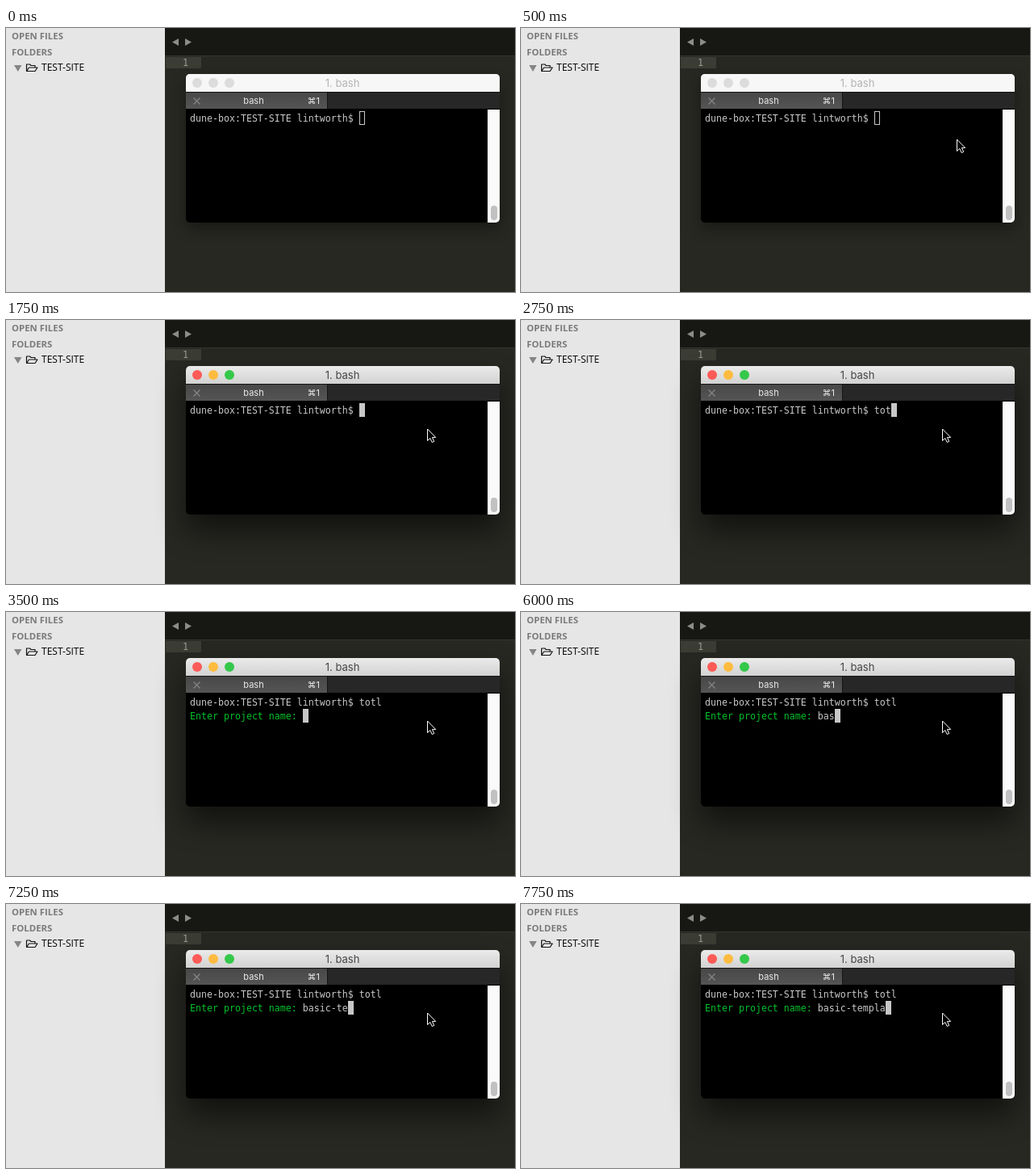
An HTML page that plays this animation: 631 by 327 pixels, repeating every 8 s.

```html
<!DOCTYPE html>
<html lang="en">
<head>
<meta charset="utf-8">
<title>Terminal project prompt</title>
<style>
html, body { margin: 0; width: 100%; height: 100%; overflow: hidden; background: #272822; }
svg { display: block; width: 631px; height: 327px; }
text { white-space: pre; }

.head { font: bold 11.4px "Open Sans", sans-serif; fill: #7b7b7b; }
.item { font: 12px "Open Sans", sans-serif; fill: #000; }
.mono { font: 11.627px "DejaVu Sans Mono", monospace; fill: #c9c9c9; }
.ui { font: 11px Inter, "DejaVu Sans", sans-serif; fill: #eaeaea; }
.title { font: 13px Inter, sans-serif; }

.win, .caret, .line2, .mouse { animation: 8s step-end infinite; }
.win { animation-name: focus; }
.caret { animation-name: type; }
.line2 { animation-name: prompt; }
.mouse { animation-name: point; }

.shadow { fill: #000; opacity: var(--shade); filter: blur(var(--blur)); transform: translateY(var(--drop)); }
.bar-top { stop-color: #ebebeb; }
.bar-end { stop-color: #d2d2d2; }
.idle-bar { fill: #f7f7f7; opacity: var(--idle); }
.title { fill: var(--title); }
.red { fill: var(--red); }
.amber { fill: var(--amber); }
.green { fill: var(--green); }
.block { fill: var(--block); stroke: #c7c7c7; }

@keyframes focus {
  0% {
    --idle: 1; --title: #b3b3b3; --block: #000;
    --red: #dcdcdc; --amber: #dcdcdc; --green: #dcdcdc;
    --shade: .35; --blur: 9px; --drop: 8px;
  }
  21.875% {
    --idle: 0; --title: #444; --block: #c7c7c7;
    --red: #fc5b57; --amber: #fdbc40; --green: #34c84a;
    --shade: .55; --blur: 18px; --drop: 20px;
  }
}

/* One character cell is 7 by 17 px. */
@keyframes type {
  0% { transform: translate(438px, 103px); }
  31.25% { transform: translate(452px, 103px); }
  34.375% { transform: translate(459px, 103px); }
  37.5% { transform: translate(466px, 103px); }
  43.75% { transform: translate(368px, 120px); }
  75% { transform: translate(389px, 120px); }
  78.125% { transform: translate(396px, 120px); }
  81.25% { transform: translate(403px, 120px); }
  84.375% { transform: translate(410px, 120px); }
  87.5% { transform: translate(417px, 120px); }
  90.625% { transform: translate(424px, 120px); }
  93.75% { transform: translate(431px, 120px); }
  96.875% { transform: translate(452px, 120px); }
}

@keyframes prompt {
  0% { opacity: 0; }
  43.75% { opacity: 1; }
}

@keyframes point {
  0% { opacity: 0; transform: translate(573px, 121px); }
  3.125% { opacity: 1; transform: translate(573px, 121px); }
  6.25% { opacity: 1; transform: translate(539px, 137px); }
  15.625% { opacity: 1; transform: translate(523px, 134px); }
  18.75% { opacity: 1; transform: translate(521px, 134px); }
}
</style>
</head>
<body>
<svg viewBox="0 0 631 327">
  <defs>
    <linearGradient id="bar" x2="0" y2="1">
      <stop class="bar-top"/>
      <stop class="bar-end" offset="1"/>
    </linearGradient>
    <linearGradient id="tab" x2="0" y2="1">
      <stop stop-color="#484848"/>
      <stop offset="1" stop-color="#555"/>
    </linearGradient>
    <clipPath id="frame"><rect x="223" y="57" width="389" height="184" rx="5"/></clipPath>
  </defs>

  <!-- Editor -->
  <rect width="631" height="327" fill="#272822"/>
  <rect x="197" width="434" height="34" fill="#171814"/>
  <rect x="197" y="34" width="434" height="1" fill="#34352e"/>
  <rect x="198" y="36" width="44" height="14" fill="#3b3c33"/>
  <path d="M214 13v9l-8-4.5zM222 13v9l8-4.5z" fill="#8c8d88"/>
  <text class="mono" x="219" y="47" style="fill:#9b9c94">1</text>

  <!-- Sidebar -->
  <rect width="197" height="327" fill="#e6e6e6"/>
  <text class="head" x="7" y="14">OPEN FILES</text>
  <text class="head" x="7" y="34">FOLDERS</text>
  <path d="M10 46h9.500l-4.750 8z" fill="#858585"/>
  <path d="M25.500 53.500v-8.500h4l1.500 1.500h5v2.500M25.500 53.500l3-4.500h10.500l-3 4.500z"
        fill="none" stroke="#111" stroke-width="1.200" stroke-linejoin="round"/>
  <text class="item" x="44" y="53">TEST-SITE</text>

  <!-- Terminal -->
  <g class="win">
    <rect class="shadow" x="223" y="57" width="389" height="184" rx="5"/>
    <g clip-path="url(#frame)">
      <rect x="223" y="57" width="389" height="184"/>
      <rect x="223" y="57" width="389" height="22" fill="url(#bar)"/>
      <rect class="idle-bar" x="223" y="57" width="389" height="22"/>
      <circle class="red" cx="237" cy="68" r="6"/>
      <circle class="amber" cx="257" cy="68" r="6"/>
      <circle class="green" cx="277" cy="68" r="6"/>
      <text class="title" x="417" y="73" text-anchor="middle">1. bash</text>

      <rect x="223" y="79" width="389" height="21" fill="#272727"/>
      <rect x="223" y="80" width="175" height="20" fill="url(#tab)"/>
      <path d="M223 79.500h389M398.500 79v21" stroke="#141414"/>
      <path d="M232.500 86.500l8 8m0-8l-8 8" stroke="#858585" stroke-width="1.200"/>
      <text class="ui" x="307" y="94" text-anchor="middle">bash</text>
      <text class="ui" x="389" y="94" text-anchor="end">⌘1</text>

      <rect x="597" y="101" width="15" height="140" fill="#fafafa"/>
      <rect x="601" y="220" width="8" height="18" rx="4" fill="#c1c1c1"/>

      <text class="mono" x="228" y="116">dune-box:TEST-SITE lintworth$ totl</text>
      <text class="mono line2" x="228" y="133"><tspan fill="#00c22a">Enter project name: </tspan>basic-templa</text>
      <!-- The black strip hides what is not typed yet. -->
      <g class="caret">
        <rect width="84" height="17"/>
        <rect class="block" x=".5" y=".5" width="6" height="16"/>
      </g>
    </g>
  </g>

  <path class="mouse" d="M1.500 1v14.500l3.300-3.100 2.400 5.100 2.500-1.100-2.300-5h4.300z"
        fill="#000" stroke="#fff" stroke-linejoin="round"/>
</svg>
</body>
</html>
```
